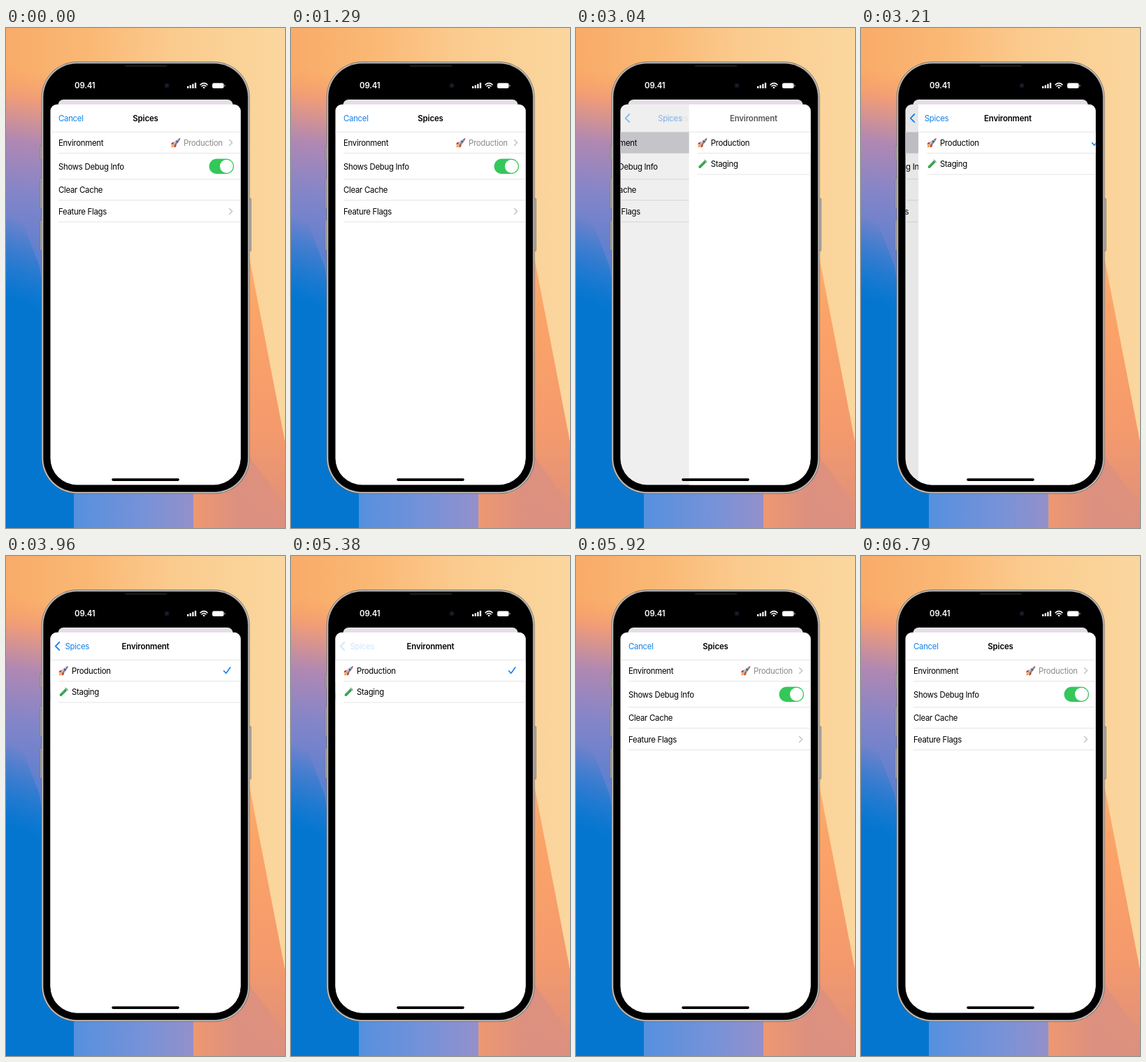
These frames come from a looping animation (399x713 px, 7.94 s). An HTML page:

```html
<!DOCTYPE html>
<html lang="en">
<head>
<meta charset="utf-8">
<title>Spices</title>
<style>
  html, body { margin: 0; width: 100%; height: 100%; overflow: hidden; }
  svg { display: block; width: 399px; height: 713px; }
  text { font: 11.4px Inter, "Open Sans", sans-serif; letter-spacing: -.025em; }
  .bold { font-weight: 600; letter-spacing: -.012em; }
  .title { text-anchor: middle; }
  .blue { fill: #1081ec; }
  .grey { fill: #8a8a8e; }
  .line { stroke: #dfdfe1; stroke-width: .8; fill: none; }
  .stroke { fill: none; stroke-linecap: round; stroke-linejoin: round; }
  .chevron { stroke: #c2c2c5; stroke-width: 1.5; }
</style>
</head>
<body>
<svg viewBox="0 0 399 713">
  <defs>
    <linearGradient id="sky">
      <stop offset="0" stop-color="#f9ab68"/><stop offset=".3" stop-color="#fab875"/>
      <stop offset=".6" stop-color="#fbcb8e"/><stop offset="1" stop-color="#fad79f"/>
    </linearGradient>
    <linearGradient id="dusk" gradientUnits="userSpaceOnUse" x1="40" y1="60" x2="-10" y2="400">
      <stop offset="0" stop-color="#f9a265" stop-opacity="0"/><stop offset=".12" stop-color="#f09c78"/>
      <stop offset=".3" stop-color="#b088b2"/><stop offset=".5" stop-color="#8685c8"/>
      <stop offset=".75" stop-color="#5f80cf"/><stop offset="1" stop-color="#3a7fd4"/>
    </linearGradient>
    <linearGradient id="deep" gradientUnits="userSpaceOnUse" x1="24" y1="275" x2="-16" y2="375">
      <stop offset="0" stop-color="#0a78d0" stop-opacity="0"/><stop offset="1" stop-color="#0576d0"/>
    </linearGradient>
    <linearGradient id="floor">
      <stop offset="0" stop-color="#5590de"/><stop offset=".6" stop-color="#7892d8"/>
      <stop offset="1" stop-color="#9490ca"/>
    </linearGradient>
    <linearGradient id="ember" x2="0" y2="1">
      <stop offset="0" stop-color="#fbb878"/><stop offset=".35" stop-color="#fba468"/>
      <stop offset=".7" stop-color="#f59a6c"/><stop offset="1" stop-color="#dc8f7c"/>
    </linearGradient>
    <linearGradient id="clay">
      <stop offset="0" stop-color="#ee9870"/><stop offset=".5" stop-color="#dc9080"/>
      <stop offset="1" stop-color="#dc9080" stop-opacity=".6"/>
    </linearGradient>
    <clipPath id="sheet">
      <path d="M63.500 118a9 9 0 0 1 9-9H326.500a9 9 0 0 1 9 9V613.500a38 38 0 0 1-38 38H101.500a38 38 0 0 1-38-38Z"/>
    </clipPath>
    <!-- 14 x 14 icons -->
    <g id="rocket">
      <path d="M5 6 1 7 0 10 4 9ZM8 9 7 13 4 14 5 10Z" fill="#d8382f"/>
      <path d="M3.500 9.500 .8 11 .2 13.800 3 13.200 5 10.800Z" fill="#f6a02b"/>
      <path d="M3.200 9 Q5 3.500 13.500 .5 Q10.500 9 5 10.800Z" fill="#7d8794"/>
      <path d="M3.200 9 Q5 3.500 13.500 .5L4 10Z" fill="#c4cad2"/>
      <path d="M10 2.200 13.500 .5 11.900 4.100Z" fill="#d8382f"/>
      <circle cx="8.600" cy="5.400" r="1.300" fill="#2b5c93"/>
    </g>
    <g id="tube" class="stroke">
      <path d="M11 3 3 11" stroke="#b9d3c3" stroke-width="4"/>
      <path d="M9.500 4.500 3 11" stroke="#27a044" stroke-width="3.200"/>
      <path d="M8 5 3 10" stroke="#73d884" stroke-width=".8"/>
      <path d="M9.500 1.300 12.700 4.500" stroke="#8fa89b" stroke-width="1.300"/>
    </g>
  </defs>

  <!-- Wallpaper -->
  <path d="M0 0H399V713H0Z" fill="url(#sky)"/>
  <path d="M0 60H120V713H0Z" fill="url(#dusk)"/>
  <path d="M0 215 48 340 97 660V713H0Z" fill="url(#deep)"/>
  <path d="M97 640H268.500V713H97Z" fill="url(#floor)"/>
  <path d="M330 235 399 590V713H268.500V600H330Z" fill="url(#ember)"/>
  <path d="M268.500 600H340L399 680V713H268.500Z" fill="url(#clay)"/>

  <!-- Phone -->
  <g fill="#b5b0ac" stroke="#716b67" stroke-width=".6">
    <rect x="49" y="168" width="4" height="20" rx="1"/>
    <rect x="49" y="214" width="4" height="43" rx="1"/>
    <rect x="49" y="274" width="4" height="43" rx="1"/>
    <rect x="346.500" y="243" width="4" height="75" rx="1"/>
  </g>
  <rect x="50.700" y="48" width="297.900" height="616.200" rx="51" fill="#6f6a67"/>
  <rect x="51.600" y="48.900" width="296.100" height="614.400" rx="50.100" fill="#d6d3d1"/>
  <rect x="52.900" y="50.200" width="293.500" height="611.800" rx="48.800" fill="#4a4745"/>
  <rect x="53.800" y="51.100" width="291.700" height="610" rx="47.900"/>
  <rect x="170" y="53.500" width="60" height="1.500" rx=".7" fill="#242424"/>
  <circle cx="230" cy="82" r="3.500" fill="#11131d"/>
  <circle cx="230" cy="82" r="1.500" fill="#1f2440"/>

  <!-- Status bar -->
  <g fill="#fff">
    <text x="98" y="86" class="bold">09.41</text>
    <path d="M259 83h2.300v3h-2.300ZM262.600 81.500h2.300v4.500h-2.300ZM266.200 79.700h2.300v6.300h-2.300ZM269.800 78h2.300v8h-2.300Z"/>
    <rect x="295" y="78.500" width="16.500" height="7.500" rx="2.300"/>
    <rect x="312.300" y="81" width="1.200" height="2.600" rx=".6" opacity=".6"/>
    <g class="stroke" stroke="#fff" stroke-width="1.600">
      <path d="M278 80.800Q283 76.500 288 80.800M280 83Q283 80.500 286 83"/>
      <circle cx="283" cy="85" r=".5"/>
    </g>
  </g>

  <!-- Sheets -->
  <path d="M74.500 112V110a8 8 0 0 1 8-8H316.500a8 8 0 0 1 8 8V112Z" fill="#e4dfe4"/>
  <g clip-path="url(#sheet)">
    <path d="M63 109H336V652H63Z" fill="#fff"/>

    <g id="menu">
      <path id="highlight" d="M63 148H426V178.500H63Z" fill="#d1d1d6"/>
      <path class="line" d="M75 178.500H336M75 215.500H336M75 245.500H336M75 276.500H336"/>
      <text x="75" y="167.500">Environment</text>
      <use href="#rocket" x="236" y="156.500"/>
      <text x="254" y="167.500" class="grey">Production</text>
      <text x="75" y="201.500">Shows Debug Info</text>
      <rect x="290.500" y="186.500" width="35.500" height="21.500" rx="10.750" fill="#34c759"/>
      <circle cx="315.300" cy="197.250" r="9.400" fill="#fff"/>
      <text x="75" y="235">Clear Cache</text>
      <text x="75" y="265.500">Feature Flags</text>
      <path class="stroke chevron" d="M319.500 159.500 323.500 163.500 319.500 167.500M319.500 257.500 323.500 261.500 319.500 265.500"/>
    </g>
    <path id="dim" d="M63 109H336V652H63Z"/>

    <g id="picker">
      <path d="M63 109H336V652H63Z" fill="#fff"/>
      <path class="line" d="M75 178.500H336M75 208.800H336"/>
      <use href="#rocket" x="75.500" y="156.500"/>
      <text x="94" y="167.500">Production</text>
      <path class="stroke" stroke="#1081ec" stroke-width="1.600" d="M311.500 163.800 314.700 167.300 320.800 158.800"/>
      <use href="#tube" x="75.500" y="187"/>
      <text x="94" y="198">Staging</text>
    </g>

    <!-- Navigation bar -->
    <path class="line" d="M63 148.300H336"/>
    <text id="cancel" x="75" y="132.800" class="blue">Cancel</text>
    <text id="menuTitle" x="199.500" y="132.800" class="bold title">Spices</text>
    <text id="pickerTitle" x="199.500" y="132.800" class="bold title">Environment</text>
    <g id="back">
      <path class="stroke" stroke="#1081ec" stroke-width="1.800" d="M76.300 123 70.800 128.600 76.300 134.200"/>
      <text id="backLabel" x="84.500" y="132.800" class="blue">Spices</text>
    </g>
    <rect x="151.200" y="642.300" width="96.600" height="3.600" rx="1.800"/>
  </g>
</svg>
<script>
  const LOOP = 7940, FPS = 24;
  const HIGHLIGHT = 63, PUSH = 69, TAP_BACK = 129, POP = 131;  // in ticks
  const WIDTH = 272, PARALLAX = -.3 * WIDTH;

  const el = id => document.getElementById(id);
  const clamp = v => Math.min(1, Math.max(0, v));
  const shift = (id, x) => el(id).setAttribute('transform', `translate(${x.toFixed(2)} 0)`);
  const fade = (id, a) => el(id).setAttribute('opacity', clamp(a).toFixed(3));

  // Critically damped spring from 0 to 1
  function spring(ticks, speed) {
    const x = Math.max(0, ticks / FPS) * speed;
    return 1 - (1 + x) * Math.exp(-x);
  }

  function draw(ms) {
    const tick = Math.floor((ms + 4) * FPS / 1000);
    const popping = tick > POP;
    let p = popping ? 1 - spring(tick - POP, 19) : spring(tick - PUSH, 13);
    if (p < .002) p = 0;
    if (p > .998) p = 1;

    shift('menu', PARALLAX * p);
    shift('picker', WIDTH * (1 - p));
    fade('dim', .1 * p);
    fade('highlight', popping ? p * p : (tick - HIGHLIGHT) / 2);

    shift('menuTitle', -90 * p);
    fade('menuTitle', 1 - 1.5 * p);
    shift('pickerTitle', 150 * (1 - p));
    fade('pickerTitle', 1.5 * p - .3);
    fade('cancel', 1 - 2 * p);
    shift('backLabel', 90 * (1 - p));
    fade('back', tick >= TAP_BACK ? .2 * p : 2 * p - .8);
  }

  function loop() {
    draw(performance.now() % LOOP);
    requestAnimationFrame(loop);
  }
  loop();
</script>
</body>
</html>
```
